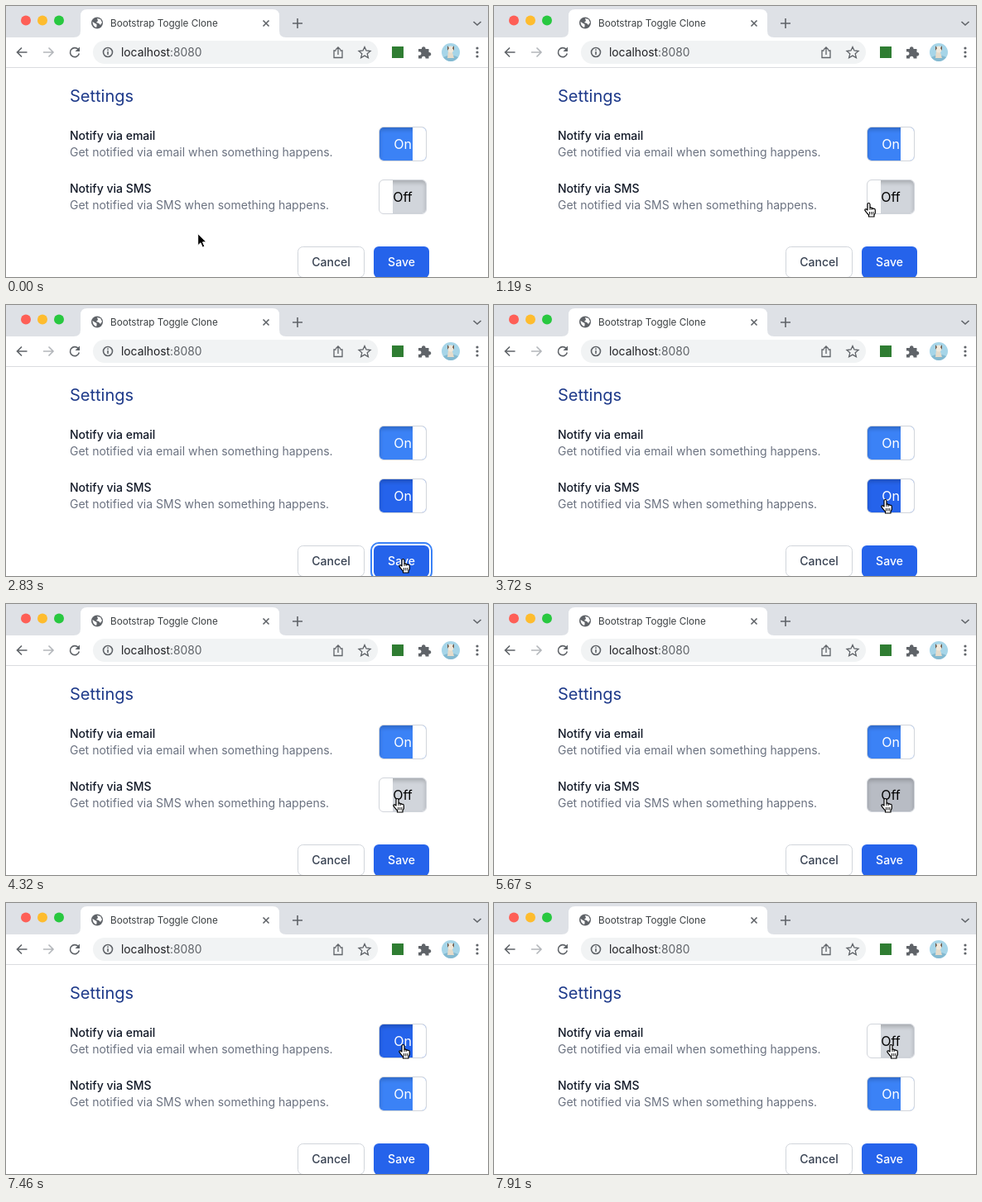
These frames come from a looping animation (582 px wide and 328 px high, 8 s). An HTML page:

```html
<!DOCTYPE html>
<html lang="en">
<head>
<meta charset="utf-8">
<title>Toggle settings</title>
<style>
  html, body { margin: 0; width: 100%; height: 100%; overflow: hidden; background: #fff; }
  svg { position: absolute; left: 0; top: 0; display: block; }
  text, .toggle { font-family: Inter, Roboto, sans-serif; }
  .icon { fill: none; stroke: #5f6368; stroke-width: 1.6; }
  .label { font-size: 14px; font-weight: 500; fill: #111827; }
  .hint { font-size: 14px; fill: #6b7280; }
  .toggle {
    position: absolute; left: 450px; width: 56px; height: 40px; overflow: hidden;
    border: 1px solid #d1d5db; border-radius: 6px; background: #fff;
    font-size: 16px; line-height: 40px; text-align: center;
  }
  .slider { position: absolute; left: 0; top: 0; width: 112px; height: 40px; }
  .slider > * { position: absolute; top: 0; height: 40px; }
  .on, .off { width: 56px; box-shadow: inset 0 3px 5px rgba(0, 0, 0, .2); }
  .on { left: 0; color: #fff; background: #3b82f6; }
  .off { left: 56px; color: #000; background: #d1d5db; }
  .handle { left: 40px; width: 32px; background: #fff; }
  .hover .on { background: #2563eb; }
  .pressed .off { background: #b8bcc4; }
  .pressed .handle { display: none; }
</style>
</head>
<body>
<svg width="582" height="328" viewBox="0 0 582 328">
  <rect width="582" height="328" fill="#fff"/>

  <!-- Tab strip -->
  <rect width="582" height="38" fill="#dee1e6"/>
  <path d="M82 38q8 0 8-8V12q0-8 8-8h224q8 0 8 8v18q0 8 8 8z" fill="#fff"/>
  <circle cx="24" cy="17.500" r="6" fill="#fe5f57"/>
  <circle cx="44" cy="17.500" r="6" fill="#febc2e"/>
  <circle cx="64" cy="17.500" r="6" fill="#28c840"/>
  <circle cx="110" cy="20.500" r="7" fill="#5f6368"/>
  <path d="M104.500 19l3 2 2 1v3l-1 1q-4-2-4-7zM110 15l4 1 2 4-2 3-2-2-3-1 2-2z" fill="#fff"/>
  <text x="126" y="25" font-size="11.700" fill="#3c4043">Bootstrap Toggle Clone</text>
  <path class="icon" d="M310.500 17.500l7 7m0-7l-7 7M346 21h12M352 15v12" stroke-width="1.700"/>
  <path class="icon" d="M564.500 19l4.500 4 4.500-4"/>

  <!-- Toolbar -->
  <path d="M0 74.500h582" stroke="#dadce0"/>
  <rect x="105" y="42" width="344" height="28" rx="14" fill="#f1f3f4"/>
  <path class="icon" d="M25.500 56h-12m5.500-5.500L13.500 56l5.500 5.500"/>
  <path class="icon" d="M45 56h12m-5.500-5.500L57 56l-5.500 5.500" style="stroke:#b4b7bb"/>
  <path class="icon" d="M87.500 53a5.500 5.500 0 1 0 .8 4.500"/>
  <path d="M89 49.500v5.500h-5.500z" fill="#5f6368"/>
  <circle class="icon" cx="123" cy="56" r="5.500" stroke-width="1.300"/>
  <path class="icon" d="M123 55v4M123 52.500v1.400"/>
  <text x="139" y="61" font-size="13.800" fill="#202124">localhost<tspan fill="#5f6368">:8080</tspan></text>
  <path class="icon" d="M398.500 54H396v8.500h10V54h-2.500M401 59v-9m-3 3l3-3 3 3" style="stroke-width:1.300"/>
  <path class="icon" d="M433 49.500l2 4.500 5 .5-3.800 3.300 1.200 4.900-4.400-2.600-4.400 2.600 1.200-4.900-3.800-3.300 5-.5z" style="stroke-width:1.300"/>
  <rect x="466" y="49" width="14" height="14" fill="#2f7d32"/>
  <path d="M498 52h4a2.300 2.300 0 1 1 4.500 0h4v4a2.300 2.300 0 1 1 0 4.500v3h-4a2.300 2.300 0 1 0-4.500 0h-4v-4a2.300 2.300 0 1 0 0-4z" fill="#5f6368"/>
  <circle cx="537" cy="56" r="11" fill="#a6d5e8"/>
  <path d="M528 62q9-5 18 0-4 5-9 5t-9-5z" fill="#83b9d0"/>
  <path d="M533 63l1-9 4-1 3 10z" fill="#e5dccb"/>
  <ellipse cx="537" cy="52.500" rx="3.500" ry="4" fill="#f0e8da"/>
  <path d="M533 48l2 3-2 3zM541 48l-2 3 2 3z" fill="#6d5848"/>
  <g fill="#5f6368">
    <circle cx="569" cy="51" r="1.600"/><circle cx="569" cy="56" r="1.600"/><circle cx="569" cy="61" r="1.600"/>
  </g>

  <!-- Page -->
  <text x="77" y="116" font-size="20" fill="#1e3a8a">Settings</text>
  <text class="label" x="77" y="162">Notify via email</text>
  <text class="hint" x="77" y="182">Get notified via email when something happens.</text>
  <text class="label" x="77" y="226">Notify via SMS</text>
  <text class="hint" x="77" y="246">Get notified via SMS when something happens.</text>
  <rect x="352.500" y="291.500" width="80" height="37" rx="6" fill="#fff" stroke="#d1d5db"/>
  <text class="label" x="392.500" y="315" text-anchor="middle" style="fill:#374151">Cancel</text>
  <rect id="ring" x="441" y="288" width="73" height="44" rx="9" fill="none" stroke="#3b82f6" stroke-width="2"/>
  <rect x="444" y="291" width="67" height="38" rx="6" fill="#2563eb"/>
  <text class="label" x="477.500" y="315" text-anchor="middle" style="fill:#fff">Save</text>
</svg>

<div class="toggle" id="email" style="top:146px">
  <div class="slider"><div class="on">On</div><div class="off">Off</div><div class="handle"></div></div>
</div>
<div class="toggle" id="sms" style="top:210px">
  <div class="slider"><div class="on">On</div><div class="off">Off</div><div class="handle"></div></div>
</div>

<svg width="582" height="328" viewBox="0 0 582 328">
  <g id="cursor" stroke-linejoin="round">
    <path id="arrow" d="M.7.500v14.300l3.300-3.100 2.300 5.400 2.500-1.100-2.300-5.200h4.500z" fill="#000" stroke="#fff"/>
    <g id="hand">
      <path d="M4 9V2.200q0-1.700 1.400-1.700T7 2.200v4q1.200-.8 2.100.6 1.200-.6 2 .7 2-.6 2.200 1.500v3.500l-1.300 2.500v2H5.500V15L2.500 11.700.8 9.200Q.8 7.500 2.300 7.800z" fill="#fff" stroke="#000" stroke-width="1.200"/>
      <path d="M6.500 11v3.500M8.700 11v3.500M10.800 11v3.500M7 6v3M9.200 7v2" stroke="#000" stroke-width=".9"/>
    </g>
  </g>
</svg>

<script>
const LOOP = 8000;
const byId = id => document.getElementById(id);

// [time, x, y, shape]
const cursorSteps = [
  [0, 231, 275, "arrow"], [890, 298, 268, "arrow"], [1040, 397, 248, "arrow"],
  [1190, 447, 238, "hand"], [1340, 478, 238, "hand"], [1490, 489, 239, "hand"],
  [2230, 488, 257, "arrow"], [2380, 479, 284, "arrow"], [2530, 474, 301, "hand"],
  [2680, 474, 307, "hand"], [3420, 471, 287, "arrow"], [3570, 467, 256, "arrow"],
  [3720, 467, 235, "hand"], [6870, 470, 226, "hand"], [7010, 473, 206, "arrow"],
  [7160, 475, 189, "arrow"], [7460, 474, 171, "hand"]
];

// [time, slide from on (0) to off (1), look]
const toggleSteps = {
  email: [[0, 0, ""], [7460, 0, "hover"], [7760, .5, "hover"], [7910, 1, ""]],
  sms: [
    [0, 1, ""], [1640, 1, "pressed"], [1790, .6, "hover"], [1940, .15, "hover"], [2090, 0, "hover"],
    [4170, .5, "hover"], [4320, 1, "hover"],
    [5670, 1, "pressed"], [5820, .6, "hover"], [5970, .15, "hover"], [6120, 0, "hover"],
    [7010, 0, ""]
  ]
};

const stepAt = (steps, time) => steps.findLast(([start]) => start <= time);

function draw(time) {
  const [, x, y, shape] = stepAt(cursorSteps, time);
  byId("cursor").setAttribute("transform", `translate(${x} ${y})`);
  for (const id of ["arrow", "hand"]) byId(id).style.display = id === shape ? "" : "none";

  for (const [id, steps] of Object.entries(toggleSteps)) {
    const [, slide, look] = stepAt(steps, time);
    const toggle = byId(id);
    toggle.className = `toggle ${look}`;
    toggle.firstElementChild.style.left = `${-56 * slide}px`;
  }
  byId("ring").style.display = time >= 2680 && time < 2980 ? "" : "none";
}

const start = performance.now();
function tick() {
  draw((performance.now() - start) % LOOP);
  requestAnimationFrame(tick);
}
tick();
</script>
</body>
</html>
```
